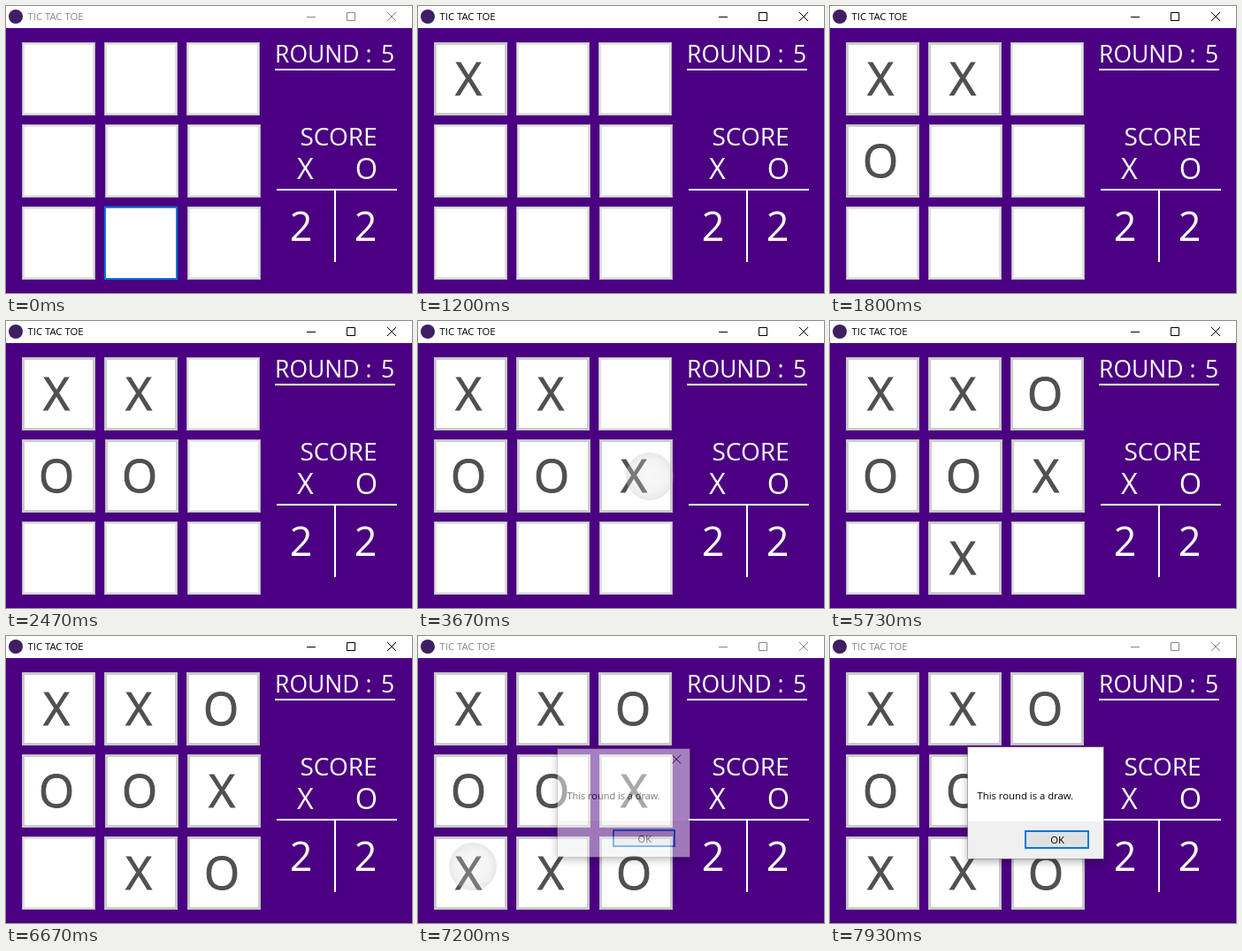
Write an HTML page that moves like this. It is 459 px wide and 325 px high and loops after 8 s.

```html
<!DOCTYPE html>
<html lang="en">
<head>
<meta charset="utf-8">
<title>Tic Tac Toe</title>
<style>
  html, body { margin: 0; width: 100%; height: 100%; overflow: hidden; background: #4b0082; }
  svg { display: block; font-family: "Open Sans", "Noto Sans", sans-serif; }
  rect { shape-rendering: crispEdges; }
  .mark { font-size: 51.5px; fill: #505050; stroke: #505050; text-anchor: middle; }
  .panel { fill: #fff; }
  .mid { text-anchor: middle; }
  .small { font-size: 11.3px; }
  .line { fill: none; stroke: currentColor; }
</style>
</head>
<body>
<svg width="459" height="325" viewBox="0 0 459 325">
  <defs>
    <radialGradient id="glow">
      <stop offset="0" stop-color="#e6e6e6" stop-opacity=".25"/>
      <stop offset=".7" stop-color="#d8d8d8" stop-opacity=".3"/>
      <stop offset="1" stop-color="#bebebe" stop-opacity=".36"/>
    </radialGradient>
  </defs>
  <rect width="459" height="325" fill="#4b0082"/>
  <rect width="459" height="25" fill="#fff"/>
  <circle cx="11" cy="12" r="8" fill="#3f1f63"/>
  <g id="bar">
    <text class="small" x="24.5" y="16" fill="currentColor">TIC TAC TOE</text>
    <path class="line" d="M340 12.5h10M385.5 7.5h9v9h-9zM431 7l10 10M441 7l-10 10"/>
  </g>

  <g class="panel">
    <text x="304" y="64" font-size="26.5">ROUND :</text>
    <text x="431.5" y="64" font-size="26.5" class="mid">5</text>
    <rect x="304" y="71" width="136" height="2"/>
    <text x="376" y="158" font-size="28" class="mid">SCORE</text>
    <g class="mid" font-size="32.5">
      <text x="338.5" y="196">X</text>
      <text x="407.5" y="196">O</text>
    </g>
    <rect x="306" y="207" width="136" height="2"/>
    <rect x="371" y="208" width="2" height="82"/>
    <g class="mid" font-size="45">
      <text x="333.5" y="266">2</text>
      <text x="406.5" y="266">2</text>
    </g>
  </g>

  <g id="board"></g>
  <circle id="ripple" r="27" fill="url(#glow)"/>

  <g id="dialog">
    <rect x="155" y="125" width="155" height="128" fill="#8a8a8a" fill-opacity=".6"/>
    <rect x="156" y="126" width="153" height="126" fill="#fff"/>
    <rect x="156" y="210" width="153" height="42" fill="#f0f0f0"/>
    <path id="cross" class="line" color="#000" d="M289 133l10 10M299 133l-10 10"/>
    <text class="small" x="166.5" y="185">This round is a draw.</text>
    <rect x="220" y="220" width="73" height="21" fill="#0078d7"/>
    <rect x="222" y="222" width="69" height="17" fill="#e1e1e1"/>
    <text class="small mid" x="257" y="235">OK</text>
  </g>
</svg>
<script>
const $ = id => document.getElementById(id);
const LOOP = 8000, FPS = 15;
const columns = [[18, 111, 204], [18, 112, 205], [18, 111, 205]];
const opening = [.2, .5, .8, .95, 1];

// cell, mark, step of the mark, step of the ripple, ripple centre
const moves = [
  [0, "X", 12, 15, 56, 82],
  [3, "O", 21, 23, 57, 176],
  [1, "X", 27, 30, 150, 82],
  [4, "O", 32, 34, 151, 176],
  [5, "X", 55, 55, 262, 176],
  [2, "O", 67, 69, 243, 83],
  [7, "X", 86, 88, 150, 267],
  [8, "O", 97, 97, 245, 268],
  [6, "X", 106, 108, 62, 261]
];

function add(name, attrs) {
  const el = document.createElementNS("http://www.w3.org/2000/svg", name);
  for (const key in attrs) el.setAttribute(key, attrs[key]);
  return $("board").appendChild(el);
}

const cells = Array.from({ length: 9 }, (_, i) => {
  const row = Math.floor(i / 3), x = columns[row][i % 3], y = 41 + 93 * row;
  const box = inset => add("rect", {
    x: x + inset, y: y + inset, width: 83 - 2 * inset, height: 83 - 2 * inset, fill: "#fff"
  });
  const cell = { edge: box(0), face: box(1), inner: box(3) };
  cell.mark = add("text", { class: "mark", x: x + 39, y: y + 59.5 });
  return cell;
});

function paintCell(cell, mark, focused) {
  cell.edge.setAttribute("fill", focused ? "#0078d7" : mark ? "#bfbfbf" : "#b4b0b8");
  cell.face.setAttribute("fill", focused ? "#0078d7" : mark ? "#cccccc" : "#e1e1e1");
  const inset = focused ? 2 : 3, x = +cell.edge.getAttribute("x"), y = +cell.edge.getAttribute("y");
  const size = 83 - 2 * inset;
  for (const [key, value] of Object.entries({ x: x + inset, y: y + inset, width: size, height: size }))
    cell.inner.setAttribute(key, value);
  cell.mark.textContent = mark;
}

function draw(ms) {
  const step = Math.floor((ms % LOOP + 4) * FPS / 1000);
  const active = step >= 11 && step < 107;
  $("bar").style.color = active ? "#000" : "#888";

  const marks = Array(9).fill("");
  let ripple = 0;
  for (const [cell, mark, shown, tap, x, y] of moves) {
    if (step >= shown) marks[cell] = mark;
    if (step >= tap && step < tap + 3) {
      ripple = 1 - (step - tap) / 3;
      $("ripple").setAttribute("cx", x);
      $("ripple").setAttribute("cy", y);
    }
  }
  $("ripple").style.opacity = ripple;
  cells.forEach((cell, i) => paintCell(cell, marks[i], i === 7 && step < 11));

  const shown = step < 107 ? 0 : opening[Math.min(step - 107, 4)];
  const scale = .94 + .06 * shown, closing = step >= 119;
  const dialog = $("dialog");
  dialog.style.opacity = shown;
  dialog.style.filter = `drop-shadow(0 3px 5px rgba(0,0,0,${closing ? .3 : .5}))`;
  dialog.setAttribute("transform", `translate(232 188.5) scale(${scale}) translate(-232 -188.5)`);
  $("cross").style.opacity = closing ? 0 : 1;
}

const start = performance.now();
function tick() {
  draw(performance.now() - start);
  requestAnimationFrame(tick);
}
tick();
</script>
</body>
</html>
```
